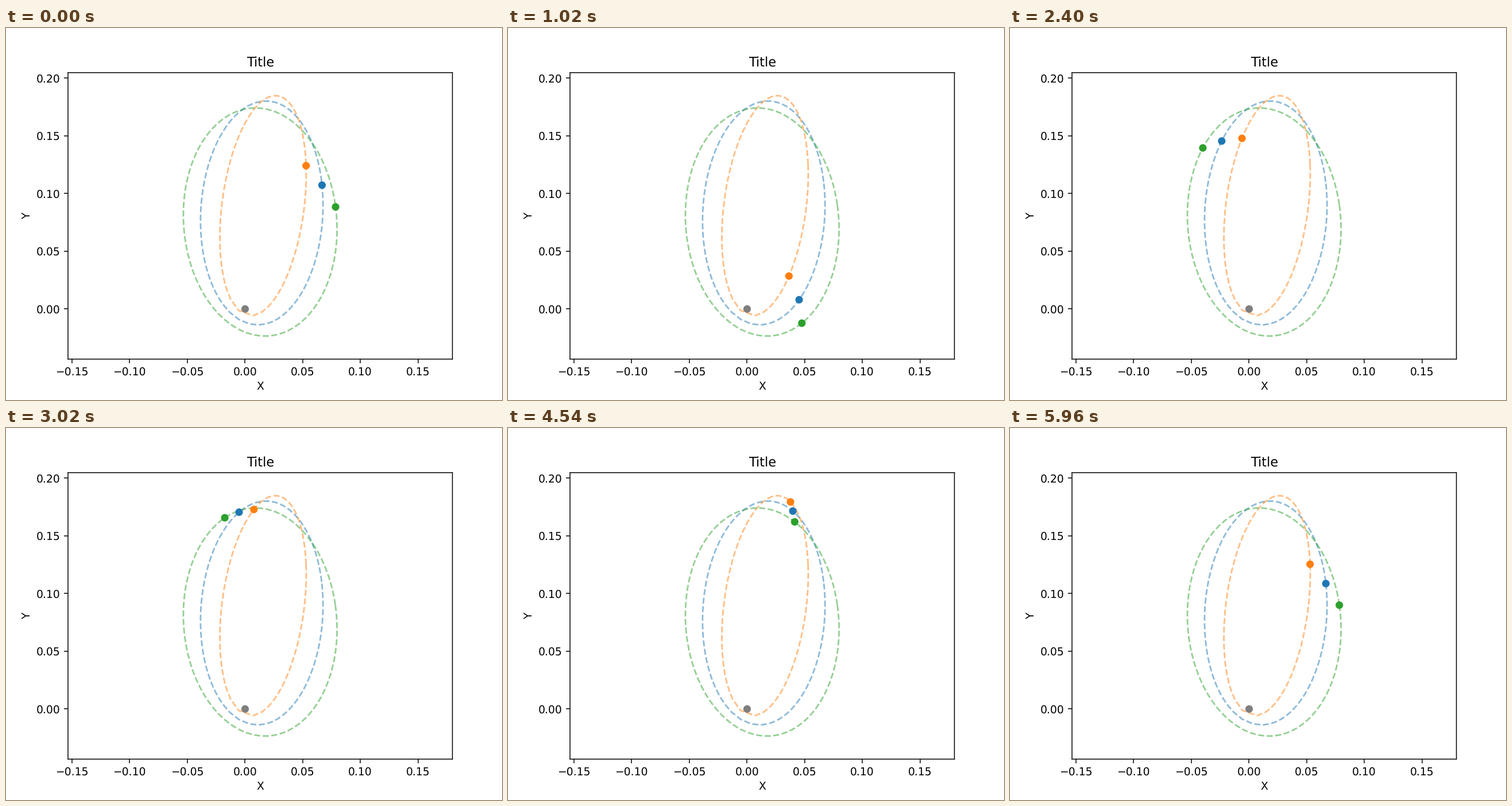
Recreate the animation shown at these times as a matplotlib script. Size 864 by 648 pixels, loop 5.98 s.

```python
import numpy as np
import matplotlib.pyplot as plt
from matplotlib.animation import FuncAnimation

FRAMES = 299
INTERVAL = 20
PAD = 0.02

# Semi-major axis, inclination, node, periapsis argument
A = 0.1246
INC, NODE, ARG = np.radians([134.87, 226.53, 64.98])
PERIOD, T_PERI, T_START = 15.9, 2002.33, 1999.0
ECCENTRICITIES = (0.8831, 0.95, 0.8)
COLORS = ("tab:blue", "tab:orange", "tab:green")


def solve_kepler(mean, ecc):
    """Eccentric anomaly by Newton's method."""
    mean = np.mod(mean, 2 * np.pi)
    E = np.full_like(mean, np.pi)
    for _ in range(40):
        E -= (E - ecc * np.sin(E) - mean) / (1 - ecc * np.cos(E))
    return E


def orbit(t, ecc):
    """Sky-projected positions at times t, one row each."""
    E = solve_kepler(2 * np.pi * (t - T_PERI) / PERIOD, ecc)
    u = A * (np.cos(E) - ecc)
    v = A * np.sqrt(1 - ecc**2) * np.sin(E)
    p = u * np.cos(ARG) - v * np.sin(ARG)
    q = (u * np.sin(ARG) + v * np.cos(ARG)) * np.cos(INC)
    x = -(p * np.sin(NODE) + q * np.cos(NODE))
    y = p * np.cos(NODE) - q * np.sin(NODE)
    return np.column_stack([x, y])


times = T_START + np.linspace(0, PERIOD, FRAMES + 1)
paths = np.array([orbit(times, ecc) for ecc in ECCENTRICITIES])

plt.rcParams["text.hinting"] = "none"
fig, ax = plt.subplots(figsize=(6.4, 4.8), dpi=135)
fig.subplots_adjust(left=0.125, right=0.9, bottom=0.11, top=0.88)

for path, color in zip(paths, COLORS):
    ax.plot(*path.T, "--", color=color, lw=1.5, alpha=0.5)
dot = dict(s=36, linewidths=1, zorder=3)
ax.scatter([0], [0], c="tab:gray", **dot)
stars = ax.scatter(*paths[:, 1].T, c=COLORS, **dot)

# Equal scales: height follows the data, width follows the axes shape
(x_lo, y_lo), (x_hi, y_hi) = paths.min(axis=(0, 1)), paths.max(axis=(0, 1))
y_lo, y_hi = y_lo - PAD, y_hi + PAD
x_mid = (x_lo + x_hi) / 2
half = (y_hi - y_lo) / 2 * (0.775 * 6.4) / (0.77 * 4.8)
ax.set_xlim(x_mid - half, x_mid + half)
ax.set_ylim(y_lo, y_hi)

ax.set_title("Title")
ax.set_xlabel("X")
ax.set_ylabel("Y")
for spine in ax.spines.values():
    spine.set_snap(False)


def update(k):
    stars.set_offsets(paths[:, k + 1])
    return [stars]


anim = FuncAnimation(fig, update, frames=FRAMES, interval=INTERVAL,
                     repeat=True, repeat_delay=0, blit=True)
plt.show()
```
